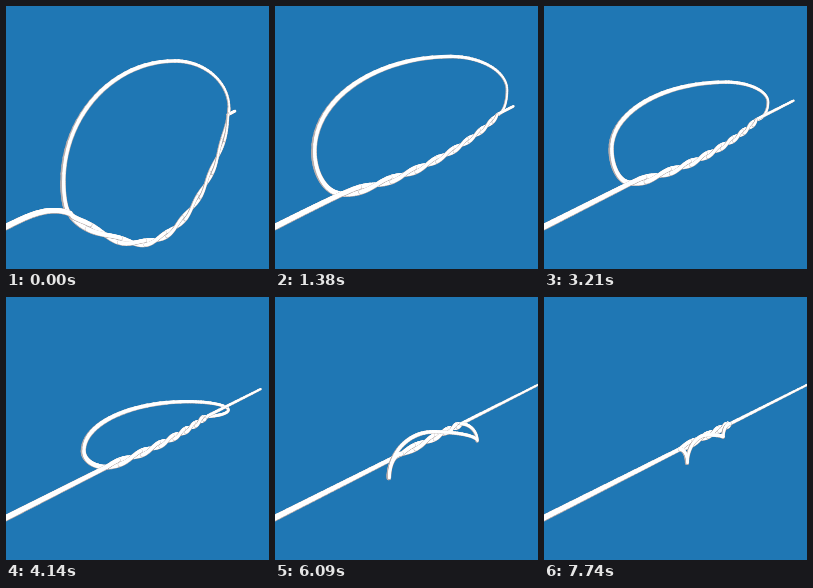
Recreate the animation shown at these times as an HTML page with a canvas. Size 263x263 px, loop 7770 ms.

```html
<!DOCTYPE html>
<html>
<head>
<meta charset="utf-8">
<style>
html, body { margin: 0; height: 100%; overflow: hidden; background: #1f77b4; }
canvas { display: block; width: 100vw; height: 100vh; }
</style>
</head>
<body>
<canvas id="c" width="263" height="263"></canvas>
<script>
const g = document.getElementById('c').getContext('2d');
const LOOP = 7770, STEP = 30;

// The open loop hangs on its right, top and left turning points.
const keys = [
  { t: 0, right: [223, 102], top: [169, 55], left: [57, 176] },
  { t: 1400, right: [232, 84], top: [176, 51], left: [39, 145] },
  { t: 3200, right: [224, 96], top: [182, 76], left: [67, 143] },
  { t: 5000, right: [219, 130], top: [178, 130], left: [88, 167] },
  { t: 6100, right: [202, 144], top: [158, 135], left: [114, 181] },
  { t: 7740, right: [179, 140], top: [164, 138], left: [143, 166] }
];

const line = x => 221 - x * .506;
const thick = x => 6.4 - x * .016;
const mix = (a, b, f) => a + (b - a) * f;
const ease = (from, to, t) => {
  const f = Math.min(1, Math.max(0, (t - from) / (to - from)));
  return f * f * (3 - 2 * f);
};

// Smooth path of one turning point through the keys.
function turningPoint(name, t) {
  const last = keys.length - 1;
  let i = 0;
  while (i < last - 1 && t >= keys[i + 1].t) i++;
  const a = keys[i], b = keys[i + 1], span = b.t - a.t, f = (t - a.t) / span;
  return [0, 1].map(j => {
    const slope = k => {
      const p = keys[Math.max(0, k - 1)], n = keys[Math.min(last, k + 1)];
      return (n[name][j] - p[name][j]) / (n.t - p.t) * span;
    };
    return mix(a[name][j], b[name][j], f * f * (3 - 2 * f))
      + slope(i) * f * (1 - f) ** 2 - slope(i + 1) * f * f * (1 - f);
  });
}

function bezier(a, b, c, d, f) {
  const e = 1 - f;
  return [0, 1].map(j => a[j] * e ** 3 + 3 * b[j] * e * e * f + 3 * c[j] * e * f * f + d[j] * f ** 3);
}

function ropeAt(t) {
  const layers = [[], [], [], []];
  let prev = null;
  const add = (p, layer) => {
    if (prev) layers[layer].push([prev, p]);
    prev = p;
  };

  const slack = Math.exp(-t / 450);
  const ax = mix(64, 136, ease(500, 7740, t)), bx = mix(222, 186, ease(2000, 5500, t));
  const sag = 78 * slack + 11 * (1 - ease(3000, 5000, t)), drop = 19 * slack;
  const turns = mix(8, 4, ease(3200, 5600, t));

  const axis = s => {
    const u = 2 * s / (1 + s), x = mix(ax, bx, u);
    const hang = Math.max(0, Math.sin(Math.PI * u ** 1.25)) ** .65;
    return [x, line(x) + sag * hang + drop * (1 - u) ** 6];
  };
  const strand = (s, side) => {
    const [x, y] = axis(s), [x0, y0] = axis(Math.max(0, s - .02)), [x1, y1] = axis(Math.min(1, s + .02));
    const o = side * .52 * thick(x) * Math.sin(Math.PI * turns * s) / Math.hypot(x1 - x0, y1 - y0);
    return [x + o * (y1 - y0), y - o * (x1 - x0)];
  };
  const twist = side => {
    for (let s = 0; s <= 1; s += 1 / 128) add(strand(s, side), side * Math.cos(Math.PI * turns * s) > 0 ? 2 : 1);
  };
  // Quarter ellipse that leaves p upright or level and reaches q the other way.
  const arc = (p, q, upright) => {
    const k = .55;
    const b = upright ? [p[0], mix(p[1], q[1], k)] : [mix(p[0], q[0], k), p[1]];
    const c = upright ? [mix(q[0], p[0], k), q[1]] : [q[0], mix(q[1], p[1], k)];
    for (let i = 1; i <= 24; i++) add(bezier(p, b, c, q, i / 24), t > 4200 ? 3 : 0);
  };

  for (let i = -1; i <= 40; i++) {
    const f = i / 40, x = ax * f;
    add([x, line(x) + drop * f ** 3], 2);
  }
  twist(1);

  const [right, top, left] = ['right', 'top', 'left'].map(name => turningPoint(name, t));
  top[1] -= 13 * Math.exp(-(((t - 1080) / 150) ** 2));
  arc(strand(1, 1), right, false);
  arc(right, top, true);
  arc(top, left, false);
  arc(left, strand(0, -1), true);

  twist(-1);
  const tip = 229 + .0071 * t - 2.2e-7 * t * t, [ex] = prev;
  for (let i = 1; i <= 20; i++) {
    const x = mix(ex, tip, i / 20);
    add([x, line(x)], 1);
  }
  return layers;
}

function stroke(a, b, width, dx, dy) {
  g.lineWidth = width;
  g.beginPath();
  g.moveTo(a[0] + dx, a[1] + dy);
  g.lineTo(b[0] + dx, b[1] + dy);
  g.stroke();
}

function draw(now) {
  const t = Math.floor(now % LOOP / STEP) * STEP;
  g.fillStyle = '#1f77b4';
  g.fillRect(0, 0, 263, 263);
  g.lineCap = 'round';
  for (const layer of ropeAt(t)) {
    g.strokeStyle = '#b9aeac';
    for (const [a, b] of layer) stroke(a, b, thick(a[0]), 0, 0);
    // Steep parts catch less light.
    g.strokeStyle = '#fff';
    for (const [a, b] of layer) {
      const w = thick(a[0]), steep = (Math.abs(b[1] - a[1]) / (Math.hypot(b[0] - a[0], b[1] - a[1]) || 1)) ** 3;
      stroke(a, b, w * (.88 - .3 * steep), w * .12 * steep, -w * .06);
    }
  }
}

const start = performance.now();
function frame() {
  draw(performance.now() - start);
  requestAnimationFrame(frame);
}
frame();
</script>
</body>
</html>
```
